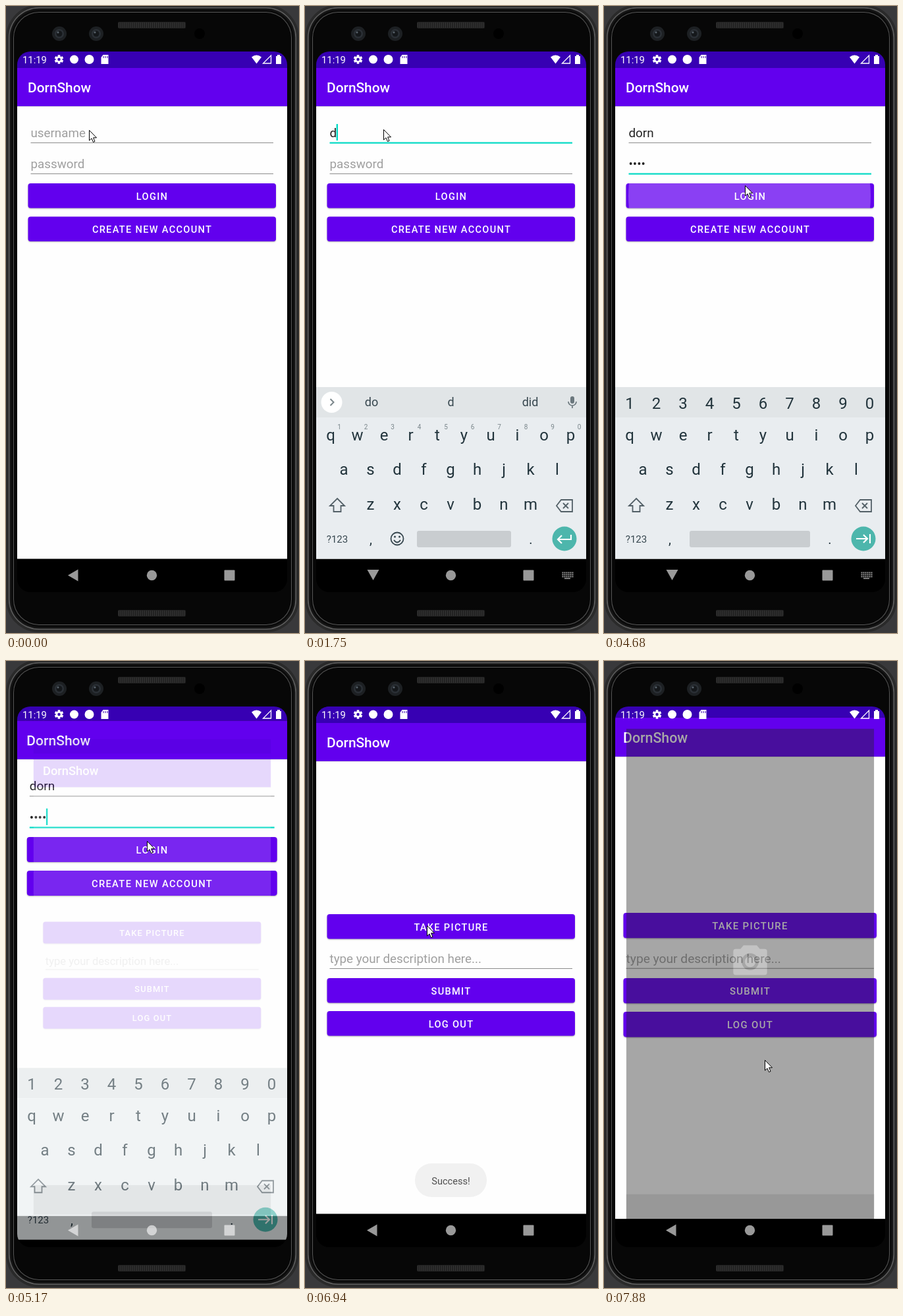
Animation, 445 px wide and 951 px high, one loop 8000 ms. Source, as an HTML page with a canvas:

```html
<!DOCTYPE html>
<html lang="en">
<head>
<meta charset="utf-8">
<title>Login demo</title>
<style>
html, body { margin: 0; width: 100%; height: 100%; overflow: hidden; background: #39393b; }
canvas { display: block; }
</style>
</head>
<body>
<canvas id="stage" width="445" height="951"></canvas>
<script>
const stage = document.getElementById('stage');
const spare = stage.cloneNode().getContext('2d');
let c = stage.getContext('2d');
let t = 0;
const LOOP = 8000, TICK = 132.3, NAV = 838.5;
const PURPLE = '#6200ee', TEAL = '#03dac5', KEY = '#22343c', GREY = '#536067', SOFT = 'rgba(255,255,255,.6)';
const center = { align: 'center' };

const clamp = (v, lo, hi) => Math.min(hi, Math.max(lo, v));
const ramp = (a, b) => clamp((t - a) / (b - a), 0, 1);
const easeOut = k => 1 - (1 - k) ** 2;
const typed = (start, gap) => clamp(Math.floor((t - start) / gap) + 1, 0, 4);

function rect(x, y, w, h, color) {
  c.fillStyle = color;
  c.fillRect(x, y, w, h);
}
function box(x, y, w, h, r, color) {
  c.fillStyle = color;
  c.beginPath();
  c.roundRect(x, y, w, h, r);
  c.fill();
}
function dot(x, y, r, color) {
  c.fillStyle = color;
  c.beginPath();
  c.arc(x, y, r, 0, 7);
  c.fill();
}
function fill(d, color, x = 0, y = 0) {
  c.save();
  c.translate(x, y);
  c.fillStyle = color;
  c.fill(new Path2D(d), 'evenodd');
  c.restore();
}
function line(d, color, width, x = 0, y = 0) {
  c.save();
  c.translate(x, y);
  c.strokeStyle = color;
  c.lineWidth = width;
  c.stroke(new Path2D(d));
  c.restore();
}
function text(s, x, y, size, color, { align = 'left', weight = 400, spacing = 0 } = {}) {
  c.font = `${weight} ${size}px Roboto, sans-serif`;
  c.letterSpacing = spacing + 'px';
  c.textAlign = align;
  c.fillStyle = color;
  c.fillText(s, x, y);
  return c.measureText(s).width;
}

// draws a group as a whole with one opacity
function layer(alpha, draw) {
  if (!alpha) return;
  const base = c;
  c = spare;
  c.clearRect(0, 0, 445, 951);
  draw();
  c = base;
  c.globalAlpha = alpha;
  c.drawImage(spare.canvas, 0, 0);
  c.globalAlpha = 1;
}
function scaled(s, draw) {
  c.save();
  c.translate(222, 479);
  c.scale(s, s);
  c.translate(-222, -479);
  draw();
  c.restore();
}

function phone() {
  rect(0, 0, 445, 951, '#39393b');
  ['#2a2a2a', '#606060', '#161616', '#0b0b0b', '#555', '#070707'].forEach((color, i) => {
    const inset = [0, 4, 5.5, 8, 11, 12][i];
    box(inset, inset - 2, 445 - 2 * inset, 952 - 2 * inset, 50 - inset, color);
  });
  for (const y of [24, 916]) {
    box(170, y, 103, 10, 2, '#222');
    for (let x = 171; x < 272; x += 3) rect(x, y + 1, 1, 8, '#343434');
  }
  for (const x of [81, 137]) {
    dot(x, 42, 11, '#1d2023');
    dot(x, 42, 7, '#2b3036');
    dot(x, 42, 4.5, '#15181b');
    dot(x - 2, 40, 1.5, '#59636c');
  }
  dot(294, 42, 8, '#000');
}

function page(body) {
  rect(17, 152, 410, 687, '#fefefe');
  rect(17, 69, 410, 25, '#3700b3');
  rect(17, 94, 410, 58, PURPLE);
  rect(17, 152, 410, 1, '#ddd');
  rect(17, NAV, 410, 51, '#000');
  text('DornShow', 33, 131, 20.9, '#fff', { weight: 500 });
  body();
}

function button(label, y, pressed) {
  c.save();
  c.shadowColor = 'rgba(0,0,0,.3)';
  c.shadowBlur = 2;
  c.shadowOffsetY = 1;
  box(33.5, y, 376.5, 37.5, 4, PURPLE);
  c.restore();
  if (t >= pressed) {
    const glow = .25 * (1 - ramp(pressed + 120, pressed + 400));
    c.save();
    c.clip();
    dot(221, y + 19, 183 + (t - pressed), `rgba(255,255,255,${glow})`);
    c.restore();
  }
  text(label, 222, y + 24.5, 14.6, '#fff', { align: 'center', weight: 500, spacing: 1.3 });
}

function field(value, hint, y, focused, caret) {
  const w = text(value || hint, 37.5, y, 18.8, value ? '#222' : '#9f9f9f');
  if (focused) rect(37.5, y + 7.5, 368.5, 2.2, TEAL);
  else rect(37.5, y + 8, 368.5, 1, '#8c8c8c');
  if (caret) rect(37 + (value ? w : 0), y - 20, 2.4, 25, TEAL);
}

function login() {
  const word = 'dorn', n = typed(2890, 120);
  const secret = n < 4 ? '•'.repeat(Math.max(0, n - 1)) + word.slice(Math.max(0, n - 1), n) : '••••';
  const onName = t >= 900 && t < 2330, onPass = t >= 2330;
  const blink = t < 3250 || Math.floor((t - 3250) / 475) % 2 === 0;
  field(word.slice(0, typed(1750, 150)), 'username', 199, onName, onName);
  field(secret, 'password', 246, onPass, onPass && blink);
  button('LOGIN', 269, 4680);
  button('CREATE NEW ACCOUNT', 319.5);
}

function post() {
  button('TAKE PICTURE', 384, 6950);
  field('', 'type your description here...', 458);
  button('SUBMIT', 481);
  button('LOG OUT', 531);
}

function camera() {
  rect(17, 69, 410, 820, '#252525');
  rect(17, NAV, 410, 51, '#000');
  fill('M-24 -46H-16L-11 -52H11L16 -46H24Q28 -46 28 -42V-7Q28 -3 24 -3H-24Q-28 -3 -28 -7V-42Q-28 -46 -24 -46Z' +
    'M-14 -25a14 14 0 1 0 28 0a14 14 0 1 0 -28 0Z' +
    'M-9 -25a9 9 0 1 0 18 0a9 9 0 1 0 -18 0Z', '#6b6b6b', 222, 479);
}

// the old window grows slightly while the new one fades in from a smaller size
function openWindow(p, from, to) {
  scaled(1 + .0475 * p, from);
  layer(p ** 1.15, () => scaled(.85 + .15 * p, to));
}

function keyRow(chars, x, y) {
  [...chars].forEach((ch, i) => text(ch, x + 40.5 * i, y, 24, KEY, center));
}

function keyboard(password) {
  rect(17, 578, 410, 46, '#e1e5e7');
  rect(17, 624, 410, NAV - 624, '#e9edf0');
  if (password) {
    keyRow('1234567890', 39, 610.5);
  } else {
    dot(40.5, 601, 16, '#fff');
    line('M-2 -5L3 0L-2 5', '#7b868b', 2, 40.5, 601);
    box(403, 592, 6, 11, 3, '#6b777d');
    line('M-6 -1A6 6 0 0 0 6 -1M0 5V9', '#6b777d', 1.7, 406, 601);
    const n = typed(1750, 150);
    const words = n < 1 ? [] : n < 3 ? ['do', 'd', 'did'] : ['door', 'dorn', 'dorm'];
    words.forEach((w, i) => text(w, 101 + 120.5 * i, 607, 18, '#37474f', center));
    [...'1234567890'].forEach((d, i) => text(d, 52 + 40.5 * i, 642, 10, '#7a868b', center));
  }
  keyRow('qwertyuiop', 39, 659);
  keyRow('asdfghjkl', 59, 711);
  keyRow('zxcvbnm', 99.5, 764);
  line('M0 -10L11 1H5.5V10H-5.5V1H-11Z', GREY, 1.8, 49, 757);
  line('M-12 0L-5 -9H12V9H-5ZM-2 -4L6 4M6 -4L-2 4', GREY, 1.8, 394, 758);
  text('?123', 49, 814, 15, '#37474f', center);
  text(',', 100, 816, 20, KEY, center);
  text('.', 343, 816, 20, KEY, center);
  if (!password) {
    line('M9.5 0A9.5 9.5 0 1 1 -9.5 0A9.5 9.5 0 1 1 9.5 0M-5 2Q0 9 5 2', '#37474f', 1.8, 140, 808);
    dot(136.5, 805, 1.5, '#37474f');
    dot(143.5, 805, 1.5, '#37474f');
  }
  const left = password ? 130 : 170;
  box(left, 796, 313 - left, 25, 3, '#c9cdd0');
  dot(394, 808, 18.5, '#4db6ac');
  line(password ? 'M-11 0H6M0 -6L6 0L0 6M10 -7V7' : 'M10 -6V1H-9M-4 -5L-10 1L-4 7', '#fff', 2.2, 394, 808);
}

function slidingKeyboard() {
  const shown = easeOut(ramp(1000, 1300)) * (1 - ramp(5100, 5290));
  layer(shown, () => {
    c.save();
    c.translate(0, 105 * (1 - shown));
    keyboard(t >= 2330);
    c.restore();
  });
}

function statusIcons() {
  text('11:19', 25, 87, 14.8, '#fff');
  c.save();
  c.translate(80.5, 81);
  for (let i = 0; i < 6; i++) {
    c.rotate(Math.PI / 3);
    rect(-1.8, -6.8, 3.6, 4, '#fff');
  }
  c.restore();
  dot(80.5, 81, 5, '#fff');
  dot(80.5, 81, 2.2, '#3700b3');
  dot(103.5, 81, 6.5, '#fff');
  dot(126.5, 81, 7, '#fff');
  fill('M-2 -7H6V7H-5V-3ZM-2 -5V-2H-1V-5ZM1 -5V-2H2V-5ZM4 -5V-2H5V-5Z', '#fff', 149.5, 81);
  fill('M0 7L-7.5 -3Q0 -9 7.5 -3Z', '#fff', 380.5, 80.5);
  line('M6 -6V6H-6Z', '#fff', 1.3, 396.5, 81);
  fill('M-4 -5H-2V-7H2V-5H4V7H-4Z', '#fff', 414, 81);
}

function navIcons() {
  if (t >= 1020 && t < 5170) {
    fill('M-9 -8H9L0 8Z', SOFT, 103.5, 863);
    for (let y = 0; y < 3; y++)
      for (let x = 0; x < 6; x++) rect(390.5 + 3 * x, 858.5 + 3 * y, 2, 2, SOFT);
    rect(394, 867.5, 9, 1.6, SOFT);
  } else {
    fill('M7.5 -9V9L-8 0Z', SOFT, 102, 863.5);
  }
  dot(221.5, 863.5, 7.7, SOFT);
  box(331.5, 855.5, 16, 16, 1, SOFT);
}

function toast() {
  box(167, 762, 109, 51, 25, '#efefef');
  text('Success!', 221.5, 794, 14.6, '#333', center);
}

// stops of the pointer: tick, x, y
const path = [[-99, 126, 188], [-27, 126, 188], [-26, 114, 185], [-23, 114, 184], [-22, 119, 187], [-1, 119, 187],
  [5, 214, 271], [12, 214, 273], [16, 199, 448], [17, 192, 398], [19, 180, 469], [21, 176, 462],
  [22, 184, 403], [24, 185, 401], [27, 231, 526], [28, 259, 683], [31, 244, 605], [99, 244, 605]];

function mouse() {
  const tick = Math.floor((t - 3780) / TICK + .75);
  const i = path.findIndex(stop => stop[0] > tick);
  const [a, ax, ay] = path[i - 1], [b, bx, by] = path[i];
  const k = (tick - a) / (b - a);
  const x = Math.round(ax + (bx - ax) * k), y = Math.round(ay + (by - ay) * k);
  const arrow = 'M.5 .5V16L4 12.8L6.5 18.5L9 17.4L6.6 11.8H11.5Z';
  fill(arrow, '#fff', x, y);
  line(arrow, '#000', 1, x, y);
}

function draw(now) {
  t = now % LOOP;
  phone();
  c.save();
  c.beginPath();
  c.roundRect(17, 69, 410, 820, 20);
  c.clip();
  const loginPage = () => page(login), postPage = () => page(post);
  if (t < 7500) openWindow(easeOut(ramp(5100, 5800)), loginPage, postPage);
  else openWindow(.45, postPage, camera);
  slidingKeyboard();
  layer(ramp(5440, 5680) * (1 - ramp(6880, 7300)), toast);
  statusIcons();
  navIcons();
  c.restore();
  mouse();
}

const start = performance.now();
(function tick() {
  draw(performance.now() - start);
  requestAnimationFrame(tick);
})();
</script>
</body>
</html>
```
